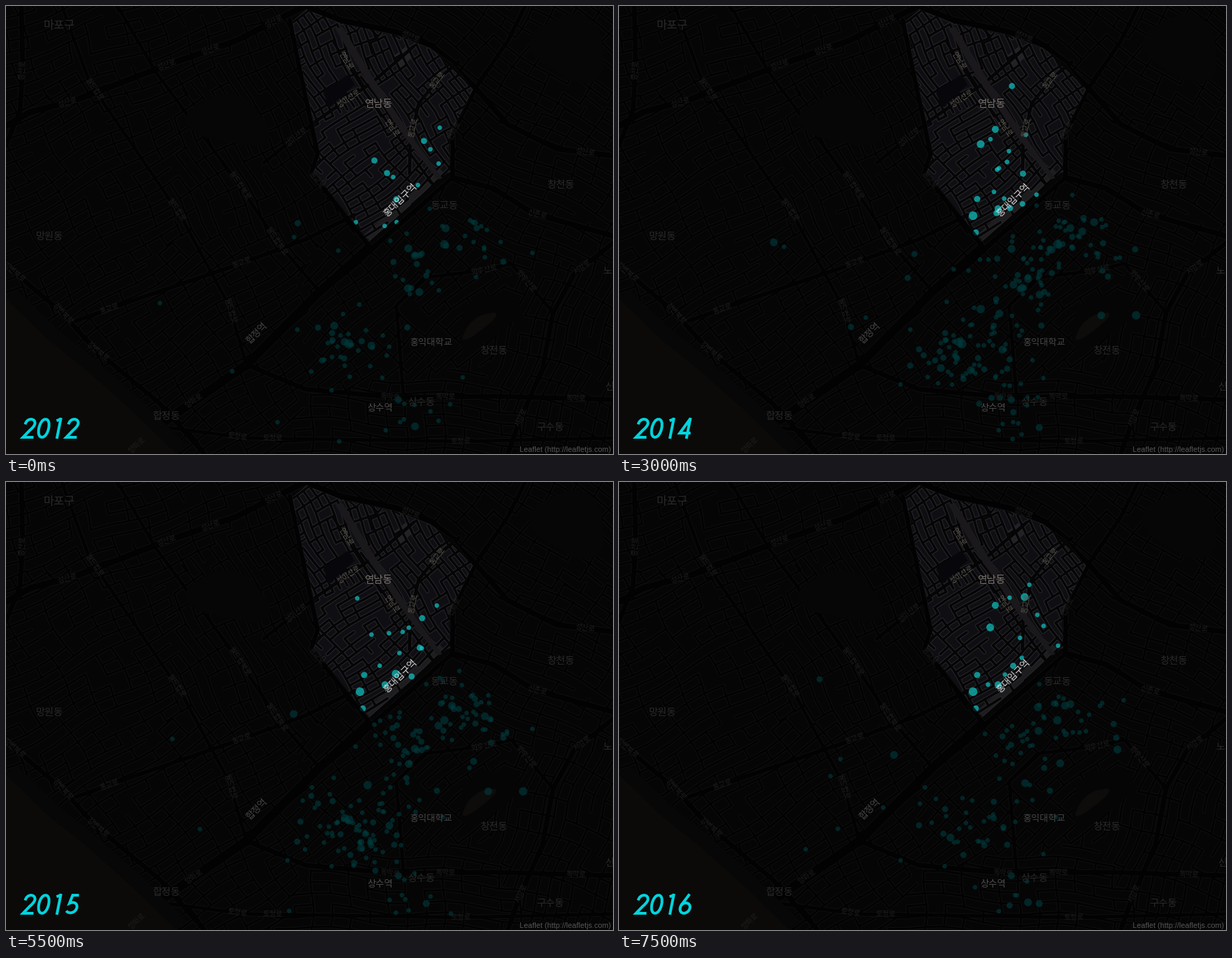
These frames come from a looping animation (871 by 643 pixels, 8 s). A matplotlib script:

```python
import numpy as np
import matplotlib.pyplot as plt
from matplotlib.animation import FuncAnimation
from matplotlib.collections import LineCollection
from matplotlib.patches import PathPatch, Polygon
from matplotlib.path import Path

W, H, DPI = 871, 643, 64
PT = 72 / DPI
QUARTERS = 16
CYAN = "#00d5de"

fig = plt.figure(figsize=(W / DPI, H / DPI), dpi=DPI, facecolor="#050505")
ax = fig.add_axes([0, 0, 1, 1])
ax.set_xlim(0, W)
ax.set_ylim(H, 0)
ax.axis("off")
rng = np.random.default_rng(7)

DISTRICT = [(431, 5), (411, 22), (426, 95), (451, 212), (442, 238),
            (525, 343), (637, 245), (636, 190), (670, 120), (640, 82),
            (607, 60), (560, 42), (480, 25)]
district = Path(DISTRICT + DISTRICT[:1])


# ---- labels -------------------------------------------------------------
def label(x, y, text, size, color, tilt=0):
    ax.text(x, y, text, family="Noto Sans CJK JP", fontsize=size * PT,
            color=color, rotation=tilt, rotation_mode="anchor", ha="center",
            va="center" if tilt else "center_baseline", zorder=4)


for x, y, text in ((62, 329, "망원동"), (230, 587, "합정동"), (596, 568, "상수동"),
                   (781, 604, "구수동"), (700, 493, "창전동"), (796, 256, "창천동"),
                   (629, 286, "동교동"), (863, 380, "노"), (866, 546, "신")):
    label(x, y, text, 14.3, "#292929")
label(76, 26, "마포구", 16.5, "#292929")
label(534, 139, "연남동", 14.5, "#77716b")
label(610, 482, "홍익대학교", 13.3, "#454545")
label(537, 576, "상수역", 13.3, "#4c4c4c")
label(360, 469, "합정역", 13.3, "#454545", 45)
label(566, 279, "홍대입구역", 13.5, "#d8d8d8", 45)
ax.text(868, 640, "Leaflet (http://leafletjs.com)", family="Liberation Sans",
        fontsize=10.75 * PT, color="#555555", ha="right", va="baseline", zorder=4)

# ---- road network -------------------------------------------------------
lines, widths = [], []


def along(pts, share):
    """Point and reading angle at a share of a polyline's length."""
    step = np.hypot(*np.diff(pts, axis=0).T)
    far = np.append(0, np.cumsum(step))
    k = min(np.searchsorted(far, share * far[-1], "right"), len(step)) - 1
    dx, dy = pts[k + 1] - pts[k]
    x, y = pts[k] + (share * far[-1] - far[k]) / step[k] * np.array([dx, dy])
    return x, y, (np.degrees(np.arctan2(-dy, dx)) + 90) % 180 - 90


def road(width, *pts, name="", at=()):
    pts = np.array(pts, float)
    lines.append(pts)
    widths.append(width)
    for share in at:
        x, y, tilt = along(pts, share)
        near = district.contains_point((x, y), radius=3)
        label(x, y, name, 10.4, "#5a544d" if near else "#1d1d1d", tilt)


def streets(inside, centres, du, dv, width, drop):
    """Warped street grids, each filling the area nearest to its centre."""
    centres = np.array(centres, float)
    n = int(450 / dv)
    i, j = (g.ravel()[:, None] for g in np.mgrid[-n:n, -n:n])
    for k, (x, y, angle) in enumerate(centres):
        a = np.radians(angle)
        u = np.array([np.cos(a), np.sin(a)])
        v = np.array([-u[1], u[0]])

        def node(i, j):
            p = (x, y) + i * du * u + j * dv * v
            return p + 4.5 * np.sin(p[:, ::-1] / (19, 27))

        for p, q, skip in ((node(i, j), node(i + 1, j), 0.12),
                           (node(i, j), node(i, j + 1), drop)):
            mid = (p + q) / 2
            gap = np.hypot(*(mid[:, None] - centres[:, :2]).transpose(2, 0, 1))
            keep = ((gap.argmin(axis=1) == k)
                    & (district.contains_points(mid) == inside)
                    & (mid > -20).all(axis=1) & (mid < (W + 20, H + 20)).all(axis=1)
                    & (rng.random(len(mid)) > skip))
            lines.extend(np.stack([p, q], axis=1)[keep])
            widths.extend([width] * keep.sum())


streets(True, [(440, 90, 62), (510, 225, -38), (590, 120, 58)], 19, 11, 3.4, 0.35)
streets(False, [(170, 40, -20), (150, 240, -28), (330, 230, 62), (290, 460, -33),
                (570, 440, -42), (600, 620, 4), (830, 500, -70), (780, 250, 25),
                (740, 70, 35)], 27, 16, 2.8, 0.3)

road(9, (0, 172), (35, 152), (100, 135), (230, 85), (330, 50), (405, 12), (440, -5),
     name="성산로", at=(0.2, 0.52, 0.66, 0.87))
road(13, (637, 245), (525, 343), (450, 410), (345, 515), (215, 605), (175, 643),
     name="양화로", at=(0.8, 0.97))
road(8, (637, 245), (700, 262), (757, 298), (871, 330), name="신촌로", at=(0.55,))
road(8, (436, 3), (480, 20), (560, 37), (612, 57), (674, 118), (720, 170),
     (790, 205), (871, 215), name="성산로", at=(0.3, 0.92))
road(6, (674, 118), (641, 183), (641, 245), name="연희로", at=(0.5,))
road(6, (674, 118), (720, 50), (745, 0))
road(6, (407, 20), (422, 95), (447, 212), (438, 240), (522, 346),
     name="동교로", at=(0.66,))
road(6, (100, 452), (190, 420), (330, 372), (430, 335), (500, 300),
     name="동교로", at=(0.12, 0.59))
road(7, (0, 372), (80, 440), (130, 495), (220, 570), (285, 643),
     name="강변북로", at=(0.04, 0.27, 0.46))
road(5, (345, 515), (320, 430), (250, 300), (120, 110), (80, 0),
     name="월드컵로", at=(0.14, 0.42, 0.78))
road(5, (450, 410), (390, 340), (330, 250), (215, 95), (160, 0),
     name="월드컵북로", at=(0.19, 0.38))
road(7, (345, 515), (430, 550), (560, 562), (700, 560), (871, 565),
     name="독막로", at=(0.4, 0.55, 0.9))
road(7, (871, 340), (815, 385), (785, 440), (770, 520), (735, 600), (720, 643),
     name="서강로", at=(0.16, 0.84))
road(5, (570, 555), (560, 430), (600, 390), (680, 380), (725, 370), (785, 440),
     name="와우산로", at=(0.67, 0.85))
road(5, (230, 605), (345, 620), (650, 625), (871, 620), name="토정로",
     at=(0.16, 0.24, 0.66))
road(7, (22, 0), (24, 90), (20, 150), (0, 200), name="증산로", at=(0.45,))
road(5, (370, 225), (445, 165), (525, 110), (585, 58), name="성미산로", at=(0.22, 0.56))
road(5, (579, 240), (580, 195), (592, 140), (622, 103), (650, 80),
     name="동교로", at=(0.36, 0.78))
road(4, (470, 52), (518, 127), (575, 205), (612, 255), name="연남로", at=(0.13, 0.6))


# ---- map layers ---------------------------------------------------------
def shape(pts, color, z, clip=None):
    patch = ax.add_patch(Polygon(pts, fc=color, ec="none", zorder=z))
    if clip is not None:
        patch.set_clip_path(clip)
    return patch


def network(casing, fill, z, clip=None):
    for extra, color in ((2, casing), (0, fill)):
        lc = LineCollection(lines, linewidths=(np.array(widths) + extra) * PT,
                            colors=color, capstyle="round", zorder=z)
        ax.add_collection(lc, autolim=False)
        if clip is not None:
            lc.set_clip_path(clip)
        z += 0.05


def blob(x, y, rx, ry, tilt, color):
    t = np.linspace(0, 2 * np.pi, 40)
    r = 1 + 0.12 * np.sin(3 * t)
    c, s = np.cos(np.radians(tilt)), np.sin(np.radians(tilt))
    px, py = rx * r * np.cos(t), ry * r * np.sin(t)
    shape(np.column_stack([x + c * px - s * py, y + s * px + c * py]), color, 1.3)


network("#0e0e0e", "#020202", 1)
blob(320, 165, 60, 34, 12, "#060606")
blob(810, 60, 55, 45, 30, "#060606")
blob(690, 450, 50, 30, -38, "#050505")
blob(678, 458, 29, 9, -38, "#0d0c0a")
bank = np.array([(0, 420), (60, 478), (115, 522), (180, 580), (245, 643)])
shape([*bank, *(bank + (14, -14))[::-1]], "#070707", 1.4)
shape([*bank, (0, 643)], "#0b0a08", 1.4)

mask = shape(DISTRICT, "#0e0e13", 2)
shape([(514, 328), (526, 342), (636, 247), (622, 233)], "#1d1d1f", 2.05, mask)
shape([(556, 72), (574, 58), (583, 74), (566, 88)], "#222226", 2.05, mask)
network("#28282b", "#050506", 2.1, mask)
shape([(455, 122), (492, 98), (500, 113), (463, 147)], "#07070b", 2.3, mask)
shape([(472, 32), (483, 30), (530, 108), (586, 192), (626, 247), (619, 249),
       (575, 192), (520, 112)], "#1a181b", 2.3, mask)

# ---- dots ---------------------------------------------------------------
SIZES, SHARES = (3.3, 4.4, 5.6), (0.72, 0.2, 0.08)

# venues that keep coming back: x, y, radius
REGULARS = [(540, 177, 5), (514, 277, 4.5), (544, 291, 5), (561, 290, 4.5),
            (508, 301, 6.2), (512, 325, 4.4), (563, 248, 4.2), (579, 284, 4),
            (630, 235, 3.3), (742, 444, 6), (692, 444, 5.5), (671, 401, 5),
            (629, 342, 6), (563, 565, 5), (603, 605, 5), (492, 485, 6.5),
            (519, 435, 6), (404, 543, 3.3)]
# nightlife hubs: x, y, weight
HUBS = np.array([(645, 325, 18), (570, 355, 12), (585, 395, 14), (695, 360, 7),
                 (495, 495, 20), (535, 525, 12), (560, 455, 10), (580, 590, 8),
                 (450, 480, 7)])


def scatter(r, centre, spread, count):
    xy = r.normal(centre, spread, (count, 2))
    return np.column_stack([xy, r.choice(SIZES, count, p=SHARES)])


def inside(dots, grow=0):
    return district.contains_points(dots[:, :2], radius=grow)


hub = HUBS[rng.choice(len(HUBS), 560, p=HUBS[:, 2] / HUBS[:, 2].sum())]
pool = scatter(rng, hub[:, :2], (29, 24), len(hub))
pool = pool[~inside(pool, 6) & (pool[:, 1] < 628) & (pool[:, :2].sum(axis=1) > 868)]


def dots_at(quarter):
    r = np.random.default_rng(100 + quarter)
    busy = np.sin(np.pi * (quarter + 3) / 21)
    crowd = pool[r.random(len(pool)) < (50 + 110 * busy) / len(pool)]
    local = scatter(r, (570, 240), (38, 52), 40)
    local = local[inside(local)][:int(9 + 5 * busy)]
    stray = scatter(r, (450, 400), (150, 100), 16)
    stray = stray[~inside(stray, 6) & (stray[:, 1] > 280)]
    regular = np.array(REGULARS)
    regular = regular[r.random(len(regular)) < (0.8 if quarter > 1 else 0.2)]
    return np.vstack([crowd, local, stray, regular])


dim = ax.scatter([], [], color="#003c3e", alpha=0.6, linewidths=0, zorder=1.8)
lit = ax.scatter([], [], color="#10d0ce", alpha=0.67, linewidths=0, zorder=3)
lit.set_clip_path(mask)

# ---- year ---------------------------------------------------------------
DIGITS = {
    "0": "M 10 27.9 C 5.5 27.9 3 22 3 15 C 3 8 5.5 2.1 10 2.1 "
         "C 14.5 2.1 17 8 17 15 C 17 22 14.5 27.9 10 27.9",
    "1": "M 5.5 25.8 L 11 28 M 11 30 L 11 0",
    "2": "M 3 20.5 C 3 25 6 27.9 9.8 27.9 C 13.8 27.9 16.6 25 16.6 21.5 "
         "C 16.6 18 14 15 11 11.8 L 3.5 2 L 18.5 2",
    "3": "M 4 22 C 4 25.6 6.8 27.9 9.8 27.9 C 13 27.9 15.5 25.2 15.5 22 "
         "C 15.5 18.5 12.8 16.3 8.5 16.3 C 13.5 16.3 17 13.7 17 9.5 "
         "C 17 5 13.8 2.1 9.8 2.1 C 5.5 2.1 3 5 2.8 9",
    "4": "M 14 0 L 14 30 M 13.6 28 L 3 8 L 18.5 8",
    "5": "M 16.5 27.9 L 7.5 27.9 L 5.2 16.3 C 11 19.5 17 16 17 10.3 "
         "C 17 3 8 0 2.8 5.5",
    "6": "M 12.8 29.5 L 4.2 14 C 1.5 8.5 4.5 2.1 10 2.1 C 14.3 2.1 17.2 5.6 17.2 9.6 "
         "C 17.2 13.6 14.2 16.8 10 16.8 C 7.5 16.8 5.5 15.8 4.2 14",
}
CODES = {"M": Path.MOVETO, "L": Path.LINETO, "C": Path.CURVE4}


def year_path(year):
    verts, codes = [], []
    for k, digit in enumerate(str(year)):
        tokens = iter(DIGITS[digit].split())
        for op in tokens:
            for _ in range(3 if op == "C" else 1):
                x, y = float(next(tokens)), float(next(tokens))
                verts.append((20.5 + 20.7 * k + x + 0.2 * y, 621 - y))
                codes.append(CODES[op])
    return Path(verts, codes)


year = ax.add_patch(PathPatch(year_path(2012), fc="none", ec=CYAN, lw=4 * PT,
                              joinstyle="miter", capstyle="butt", zorder=5))


def draw(quarter):
    dots = dots_at(quarter)
    for layer in (dim, lit):
        layer.set_offsets(dots[:, :2])
        layer.set_sizes((2 * dots[:, 2] * PT) ** 2)
    year.set_path(year_path(2012 + (quarter + 2) // 4))
    return dim, lit, year


anim = FuncAnimation(fig, draw, frames=QUARTERS, interval=500,
                     repeat=True, repeat_delay=0)
plt.show()
```
